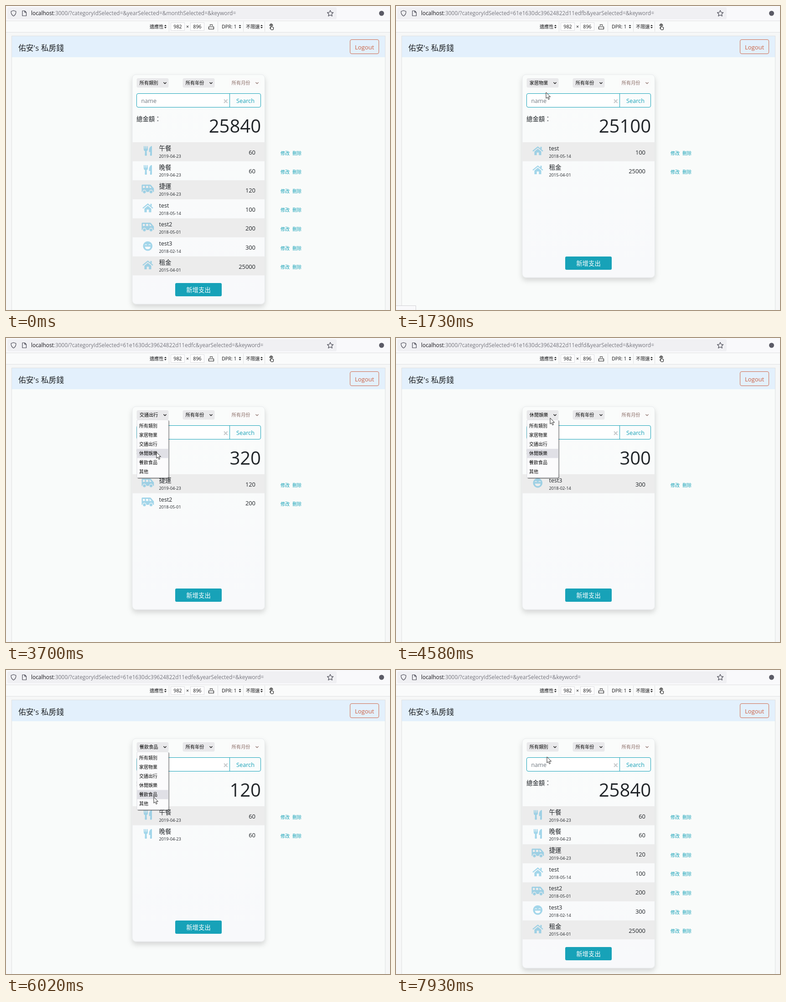
Write an HTML page that moves like this. It is 842 by 665 pixels and loops after 8 s.

```html
<!DOCTYPE html>
<html lang="zh-Hant">
<head>
<meta charset="utf-8">
<title>私房錢</title>
<style>
  html, body { margin: 0; width: 100%; height: 100%; overflow: hidden; background: #f6f7f7; }
  svg { display: block; width: 100vw; height: 100vh; }
  text { font-family: "Open Sans", "Noto Sans", "Noto Sans CJK TC", "Noto Sans CJK JP", sans-serif; fill: #212529; white-space: pre; }
  .mid { text-anchor: middle; }
  .end { text-anchor: end; }
  .small { font-size: 10.7px; fill: #18181a; }
  .tiny { font-size: 10.2px; fill: #18181a; }
  .select { font-size: 10.2px; fill: #000; }
  .body { font-size: 13.4px; }
  .link { font-size: 10px; fill: #17a2b8; }
  .line { fill: none; stroke: #4a4a55; stroke-width: 1.2; stroke-linejoin: round; stroke-linecap: round; }
  .dark { stroke: #222; }
</style>
</head>
<body>
<svg viewBox="0 0 842 665">
  <defs>
    <linearGradient id="cardFill" x2="0" y2="1">
      <stop stop-color="#fafcfb"/><stop offset="1" stop-color="#f8f9fb"/>
    </linearGradient>
    <filter id="cardShadow" x="-10%" y="-10%" width="120%" height="120%">
      <feDropShadow dx="0" dy="6" stdDeviation="6" flood-opacity=".15"/>
    </filter>
    <filter id="popShadow" x="-10%" y="-10%" width="120%" height="120%">
      <feDropShadow dx="1.5" dy="1.5" stdDeviation=".6" flood-opacity=".55"/>
    </filter>
  </defs>

  <!-- browser bar -->
  <rect width="842" height="32" fill="#f9f9fb"/>
  <rect x="3" y="3" width="722" height="26" rx="3" fill="#f0f0f3"/>
  <path class="line" d="M16.5 10l5.3 1.8q.6 7-5.3 10.2q-5.9-3.2-5.3-10.2z"/>
  <path class="line" d="M36 10.5h5l3.5 3.5v7.5h-8.5zM41 10.5v3.5h3.5"/>
  <text x="55" y="20.3" font-size="11.9"><tspan fill="#15141a">localhost</tspan><tspan id="query" fill="#77777f"></tspan></text>
  <path class="line" d="M711 9.5l2 4.3 4.6.5-3.4 3.2 1 4.6-4.2-2.4-4.2 2.4 1-4.6-3.4-3.2 4.6-.5z"/>
  <circle cx="823.5" cy="16" r="5.5" fill="#5b5b66"/>

  <!-- device toolbar -->
  <rect y="32" width="842" height="25.5" fill="#fafbfb"/>
  <path d="M0 32.5H842M0 57.5H842M357.5 34V56M464.5 34V56M520.5 34V56M567.5 34V56" stroke="#e0e0e2"/>
  <g fill="#fff" stroke="#dedee2">
    <rect x="361.5" y="36.5" width="30" height="17"/><rect x="404.5" y="36.5" width="30" height="17"/>
  </g>
  <text class="tiny" x="315" y="48.8">適應性</text>
  <text class="small mid" x="376.5" y="49">982</text>
  <text class="small mid" x="398" y="49">×</text>
  <text class="small mid" x="419.5" y="49">896</text>
  <text class="small" x="473" y="48.5">DPR: 1</text>
  <text class="tiny" x="526" y="48.8">不限速</text>
  <path id="spinner" fill="#222" d="M347 44h5l-2.5-3zM347 46h5l-2.5 3z"/>
  <use href="#spinner" x="163.5"/><use href="#spinner" x="211"/>
  <path class="line dark" d="M444.5 45.5h11v5h-11zM447.5 43v-2h5v2"/>
  <path class="line dark" d="M580.5 48v-6.5q1-1.5 2 0v4l3.5 1q1 .5.5 2.5l-1 3h-4l-3-4q.5-1.5 2 0M578.5 43.5a3.2 3.2 0 1 1 6 0"/>

  <!-- page -->
  <rect x="12.5" y="65.5" width="819" height="620" fill="#f9fbfa" stroke="#dfe1e2"/>
  <rect x="13" y="66" width="818" height="46" fill="#e3f0fc"/>
  <text x="27" y="97.5" font-size="16.8">佑安's 私房錢</text>
  <rect x="754.5" y="73.5" width="63" height="31" rx="3.5" fill="none" stroke="#cf6a4c"/>
  <text class="mid" x="786" y="95" font-size="13" style="fill:#cb6040">Logout</text>

  <g id="card"></g>
  <g id="popup"></g>
  <path id="status" d="M-1 655.5H43.5V666H-1z" fill="#f9f9fb" stroke="#d2d2d6"/>
  <path id="cursor" d="M0 0V13.2L3 10.5 5.2 15.5 7.4 14.5 5.2 9.7H9.5Z" fill="#fff" stroke="#111" stroke-width=".9"/>
</svg>

<script>
const LOOP = 8000, ROW = 41.62, TOP = 298, POP_TOP = 182.5, ITEM = 20;
const $ = id => document.getElementById(id);

const categories = ['所有類別', '家居物業', '交通出行', '休閒娛樂', '餐飲食品', '其他'];
const records = [
  ['午餐', '2019-04-23', 60, 4], ['晚餐', '2019-04-23', 60, 4],
  ['捷運', '2019-04-23', 120, 2], ['test', '2018-05-14', 100, 1],
  ['test2', '2018-05-01', 200, 2], ['test3', '2018-02-14', 300, 3],
  ['租金', '2015-04-01', 25000, 1]
];

// The menu opens at a steady pace; each round picks the next category.
const rounds = [[1590, 316], [2680, 328], [3970, 330], [5190, 337], [6360, 322], [7790, 331]]
  .map(([pick, x], i) => {
    const category = (i + 1) % categories.length;
    return { category, open: 900 + 1200 * i, pick, load: pick + 70, list: pick + 140, spot: [x, 190 + ITEM * category] };
  });

const ENTRY = [686, 577], SELECT = [338, 175];
const moves = [{ start: 70, time: 760, to: SELECT }];
rounds.forEach((r, i) => {
  moves.push({ start: r.open + 80, time: 300, to: r.spot });
  if (i < rounds.length - 1) moves.push({ start: r.pick, time: 250, to: SELECT });
});

const ease = p => p * p * (3 - 2 * p);

function pointer(t) {
  return moves.reduce((from, { start, time, to }) => {
    const e = ease(Math.min(1, Math.max(0, (t - start) / time)));
    return from.map((v, axis) => v + (to[axis] - v) * e);
  }, ENTRY);
}

// Category of the latest round that has reached the given stage.
function reached(stage, t, initial = 0) {
  const done = rounds.filter(r => r[stage] <= t);
  return done.length ? done[done.length - 1].category : initial;
}

const text = (cls, x, y, value, extra = '') => `<text class="${cls}" x="${x}" y="${y}" ${extra}>${value}</text>`;

const icons = {
  1: () => `<path d="M300 19.5L311 10.5 322 19.5" fill="none" stroke="#6bbfe0" stroke-width="2.3"/>
    <path d="M316.5 10h3v5h-3zM303.5 20.3L311 14.2 318.5 20.3V28.3H313.3V22.5H308.7V28.3H303.5Z"/>`,
  2: bg => `<path fill-rule="evenodd" d="M299 9.5H315.5Q317 9.5 318 10.5L322.5 16Q324.3 17 324.3 19V25.5H297.5V11Q297.5 9.5 299 9.5ZM300 12.3V16.8H304.5V12.3ZM307 12.3V16.8H312V12.3ZM314.5 12.3V16.8H319.3L315.5 12.3Z"/>
    <g stroke="${bg}" stroke-width="1.3"><circle cx="303.5" cy="25.3" r="3.8"/><circle cx="318" cy="25.3" r="3.8"/></g>`,
  3: bg => `<circle cx="310.8" cy="19" r="10.4"/>
    <path d="M304.5 17q2.2-3 4.4 0M312.7 17q2.2-3 4.4 0" fill="none" stroke="${bg}" stroke-width="1.3"/>
    <path d="M304.5 20.5h12.6q-1 5.5-6.3 5.5t-6.3-5.5z" fill="${bg}"/>`,
  4: () => `<path d="M302 8.5h1.7l.4 6h.9l.4-6h1.7l.4 6h.9l.4-6h1.7l.6 7q0 3-2.7 4l.5 8.5q0 1.5-1.5 1.5h-1.5q-1.5 0-1.5-1.5l.5-8.5q-2.9-1-2.9-4z"/>
    <path d="M320 9.3V28q0 1.5-1.5 1.5h-1.3q-1.5 0-1.4-1.5l.6-6.5h-2.7q-1-9.5 4.5-13 1.8-.5 1.8.8z"/>`
};

function row([name, date, amount, kind], i) {
  const bg = i % 2 ? '#fafbfb' : '#ececec';
  return `<g transform="translate(0 ${TOP + i * ROW})">
    ${i % 2 ? '' : `<rect x="277" width="290.5" height="41.6" fill="${bg}"/>`}
    <g fill="#6bbfe0" opacity=".6">${icons[kind](bg)}</g>
    ${text('', 335.5, 18, name, `font-size="${name.startsWith('test') ? 12.5 : 13.5}"`)}
    ${text('', 335.5, 33.7, date, 'font-size="9.25"')}
    ${text('end', 547, 26.8, amount, 'font-size="12.9"')}
    ${text('link', 602, 27.5, '修改')}${text('link', 628, 27.5, '刪除')}</g>`;
}

function select(x, label, muted) {
  const color = muted ? '#8a6d66' : '#000';
  return `<rect x="${x}" y="158" width="70" height="20.5" rx="3.5" fill="${muted ? '#fafafa' : '#e9e9eb'}"/>
    ${text('select mid', x + 26.7, 172, label, `style="fill:${color}"`)}
    <path d="M${x + 59} 167l3 3 3-3" fill="none" stroke="${color}" stroke-width="1.2"/>`;
}

function card(choice, category) {
  const rows = records.filter(r => !category || r[3] === category);
  const total = rows.reduce((sum, r) => sum + r[2], 0);
  const bottom = category ? 594 : 652;
  return `<rect x="277" y="150" width="290.5" height="${bottom - 150}" rx="8" fill="url(#cardFill)" stroke="#e3e5e7" stroke-width=".8" filter="url(#cardShadow)"/>
    ${select(286.5, categories[choice])}${select(387.5, '所有年份')}${select(488.5, '所有月份', true)}
    <rect x="286.5" y="191.5" width="272" height="30" rx="3.5" fill="#fff"/>
    <rect x="491" y="192" width="67" height="29" rx="3" fill="#fafcfc"/>
    <rect x="286.5" y="191.5" width="272" height="30" rx="3.5" fill="none" stroke="#17a2b8"/>
    <path d="M490.5 191.5v30" stroke="#17a2b8"/>
    ${text('', 296.5, 212, 'name', 'font-size="12.6" style="fill:#6c757d"')}
    <path d="M478 204.5l7.5 7.5m0-7.5l-7.5 7.5" stroke="#c9cbcd" stroke-width="2.3"/>
    ${text('mid', 525, 212.4, 'Search', 'font-size="12.7" style="fill:#17a2b8"')}
    ${text('body', 286, 251.5, '總金額：')}
    ${text('end', 559, 277, total, 'font-size="40"')}
    ${rows.map(row).join('')}
    <rect x="371" y="${bottom - 46}" width="102" height="29" rx="3" fill="#17a2b8"/>
    ${text('body mid', 422, bottom - 26.5, '新增支出', 'style="fill:#fff"')}`;
}

function popup(active) {
  return `<rect x="287" y="179" width="69" height="126.5" rx="2" fill="#fbfbfc" stroke="#cfcfd4" stroke-width=".7" filter="url(#popShadow)"/>
    <rect x="287.3" y="${POP_TOP + active * ITEM}" width="68.4" height="${ITEM}" fill="#e0e0e6"/>
    ${categories.map((c, i) => text('select', 292, 196.3 + i * ITEM, c, 'style="font-size:10px"')).join('')}`;
}

function query(category) {
  const id = category > 0 ? '61e1630dc39624822d11edf' + 'abcdef'[category] : '';
  const month = category < 0 ? '&monthSelected=' : '';
  return `:3000/?categoryIdSelected=${id}&yearSelected=${month}&keyword=`;
}

const drawn = {};
function update(id, key, make) {
  if (drawn[id] === key) return;
  drawn[id] = key;
  $(id).innerHTML = make();
}

function draw(t) {
  const choice = reached('pick', t), category = reached('list', t);
  const open = rounds.some(r => t >= r.open && t < r.pick);
  const loading = rounds.some(r => t >= r.load && t < r.list + 70 && t < LOOP - 70);
  const [x, y] = pointer(t).map(Math.round);
  // The menu keeps its current choice lit until the pointer is well inside.
  const active = y < POP_TOP + 5 ? choice : Math.floor((y - POP_TOP) / ITEM);

  update('card', `${choice}/${category}`, () => card(choice, category));
  update('popup', open ? active : 'closed', () => open ? popup(active) : '');
  $('query').textContent = query(reached('load', t, -1));
  $('status').style.display = loading ? '' : 'none';
  $('cursor').style.display = t < moves[0].start ? 'none' : '';
  $('cursor').setAttribute('transform', `translate(${x} ${y})`);
}

const start = performance.now();
function tick() {
  draw((performance.now() - start) % LOOP);
  requestAnimationFrame(tick);
}
tick();
</script>
</body>
</html>
```
